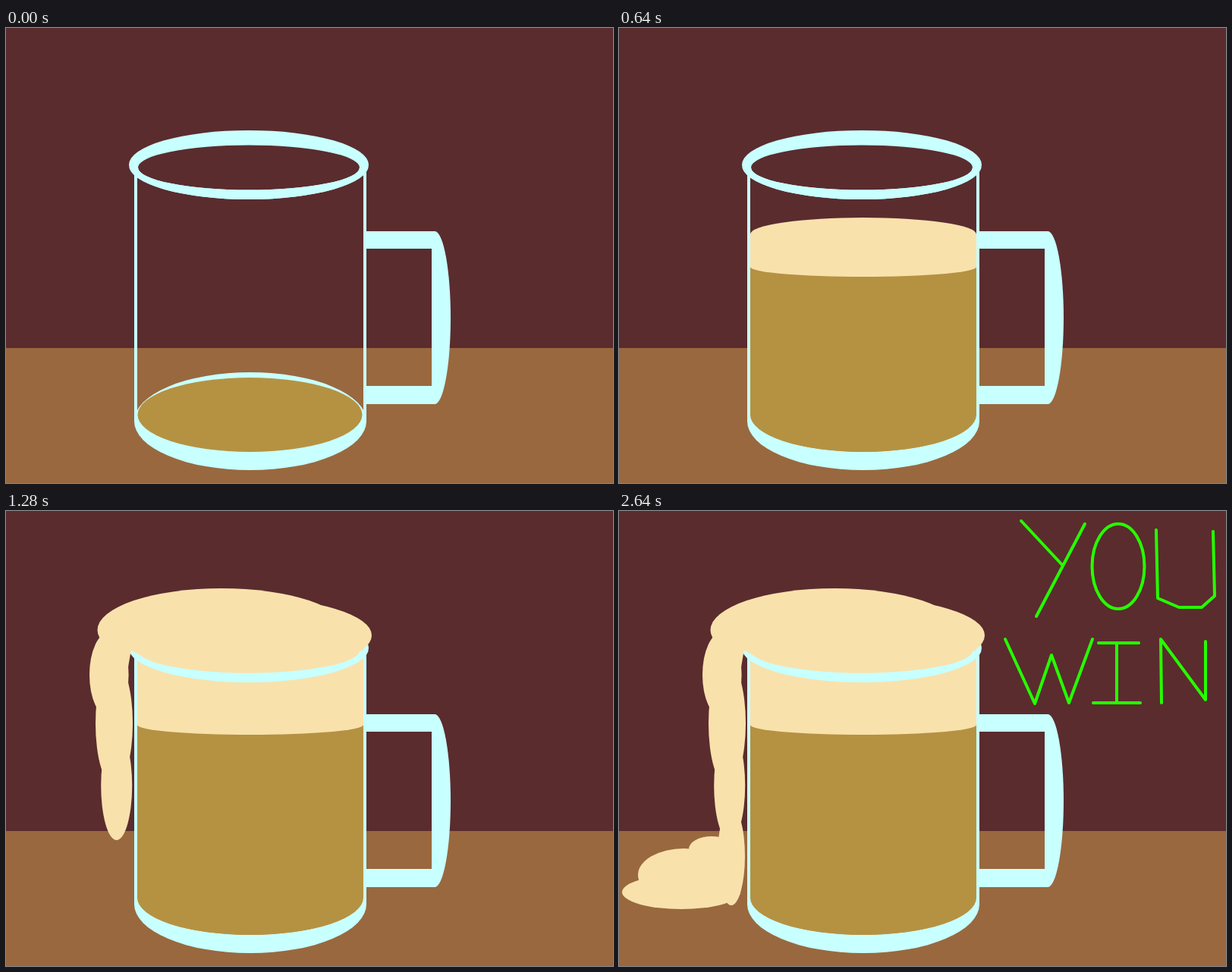
Recreate the animation shown at these times as an HTML page with a canvas. Size 800 by 600 pixels, loop 3.84 s.

```html
<!DOCTYPE html>
<html lang="en">
<head>
<meta charset="utf-8">
<title>Beer mug</title>
<style>
html, body { margin: 0; width: 100%; height: 100%; overflow: hidden; background: #5a2c2e; }
canvas { display: block; }
</style>
</head>
<body>
<canvas id="stage" width="800" height="600"></canvas>
<script>
const ctx = document.getElementById('stage').getContext('2d');
const LOOP = 3840, STEP = 80, LAST = 33;
const WALL = '#5a2c2e', TABLE = '#99683f', GLASS = '#c8ffff';
const BEER = '#b59242', FOAM = '#f9e1ac', GREEN = '#26ff00';

function oval(color, x, y, rx, ry) {
  ctx.fillStyle = color;
  ctx.beginPath();
  ctx.ellipse(x, y, rx, ry, 0, 0, Math.PI * 2);
  ctx.fill();
}

function box(color, x, y, w, h) {
  ctx.fillStyle = color;
  ctx.fillRect(x, y, w, h);
}

function clipped(x, y, w, h, draw) {
  ctx.save();
  ctx.beginPath();
  ctx.rect(x, y, w, h);
  ctx.clip();
  draw();
  ctx.restore();
}

// Piecewise linear value over [step, value] points
function track(points, k) {
  if (k <= points[0][0]) return points[0][1];
  for (let i = 1; i < points.length; i++) {
    const [a, va] = points[i - 1], [b, vb] = points[i];
    if (k <= b) return va + (vb - va) * (k - a) / (b - a);
  }
  return points[points.length - 1][1];
}

// Cylinder slice: curved top at y1, curved bottom at y2
function slice(color, y1, r1, y2, r2) {
  ctx.fillStyle = color;
  ctx.beginPath();
  ctx.ellipse(322, y1, 149, r1, 0, Math.PI, Math.PI * 2);
  ctx.ellipse(322, y2, 149, r2, 0, 0, Math.PI);
  ctx.closePath();
  ctx.fill();
}

function rim() {
  ctx.fillStyle = GLASS;
  ctx.beginPath();
  ctx.ellipse(320, 180.5, 158, 45.5, 0, 0, Math.PI * 2);
  ctx.closePath();
  ctx.moveTo(466, 184);
  ctx.ellipse(320, 184, 146, 29.5, 0, 0, Math.PI * 2);
  ctx.fill('evenodd');
}

function handle() {
  box(GLASS, 474, 268, 91, 23);
  box(GLASS, 474, 472, 91, 24);
  box(GLASS, 561, 268, 5, 228);
  ctx.beginPath();
  ctx.ellipse(565, 382, 21, 114, 0, -Math.PI / 2, Math.PI / 2);
  ctx.fill();
}

const level = [[0, 512], [4, 402], [7, 337], [9, 293], [10, 282]];
const foamTop = [[4, 402], [7, 300], [8, 272], [9, 235], [10, 200], [11, 184]];
const foamCurve = [[1, 17], [4, 15.5], [8, 22], [11, 29]];

function drinks(k) {
  if (k < 1) return;
  const y = track(level, k);
  const top = k < 4 ? y : track(foamTop, k);
  slice(BEER, y, 13, 510, 49);
  slice(FOAM, top, track(foamCurve, k), y, k < 5 ? track(foamCurve, k) : 13);
}

function overflow(k) {
  if (k === 12) oval(FOAM, 273, 150, 130, 45);
  if (k > 12) {
    const p = k === 13 ? 0.5 : 1;
    clipped(0, 0, 800, 187, () =>
      oval(FOAM, 273 + 11 * p, 150 + 7 * p, 130 + 33.5 * p, 45 + 10 * p));
  }
}

function spill(k) {
  if (k < 15) return;
  ctx.fillStyle = FOAM;
  ctx.beginPath();
  ctx.moveTo(140, 165);
  ctx.lineTo(165, 180);
  ctx.lineTo(164, 188);
  ctx.lineTo(161, 206);
  ctx.lineTo(140, 206);
  ctx.fill();
  oval(FOAM, 135.8, 216, 25.8, 56);
  oval(FOAM, 142.5, 280, 24.5, 82);
  if (k > 15) oval(FOAM, 145.7, 362, 20.5, 72);
  if (k === 17) oval(FOAM, 148, 428, 18, 50);
  if (k > 17) oval(FOAM, 148, 455, 18, 65);
  if (k > 18) {
    const left = track([[19, 78], [21, 4]], k);
    oval(FOAM, (left + 160) / 2, 502.5, (160 - left) / 2, 22.5);
  }
  if (k > 21) oval(FOAM, 85.5, 480, 60.5, 35);
  if (k > 22) oval(FOAM, 122, 446, 30, 17);
}

function line(...pts) {
  ctx.beginPath();
  for (let i = 0; i < pts.length; i += 2) ctx.lineTo(pts[i], pts[i + 1]);
  ctx.stroke();
}

const letters = [
  () => { line(530, 13, 584, 71); line(614, 17, 550, 139); },
  () => {
    ctx.beginPath();
    ctx.ellipse(658, 73, 34.5, 56, 0, 0, Math.PI * 2);
    ctx.stroke();
  },
  () => line(708, 25, 710, 115, 738, 127, 768, 127, 785, 112, 783, 27),
  () => line(509, 169, 548, 254, 570, 190, 593, 253, 624, 169),
  () => { line(632, 174, 685, 174); line(656, 174, 656, 253); line(625, 253, 687, 253); },
  () => line(715, 253, 714, 169, 773, 249, 773, 172)
];

function words(k) {
  ctx.strokeStyle = GREEN;
  ctx.lineWidth = 4;
  ctx.lineCap = ctx.lineJoin = 'round';
  letters.forEach((draw, i) => { if (k >= 23 + 2 * i) draw(); });
}

function paint(k) {
  box(WALL, 0, 0, 800, 422);
  box(TABLE, 0, 422, 800, 178);
  handle();
  oval(GLASS, 322, 518.5, 153, 64.5);
  oval(BEER, 321.5, 510, 148, 49);
  rim();
  drinks(k);
  box(GLASS, 169, 188, 4, 332);
  box(GLASS, 471, 188, 4, 332);
  overflow(k);
  clipped(0, 184, 800, 60, rim);
  if (k > 10) oval(FOAM, 317, 164, 165, 49.5);
  spill(k);
  words(k);
}

let shown = -1;
const start = performance.now();
function tick() {
  const t = (performance.now() - start) % LOOP;
  const k = Math.min(LAST, Math.floor(t / STEP));
  if (k !== shown) paint(shown = k);
  requestAnimationFrame(tick);
}
tick();
</script>
</body>
</html>
```
